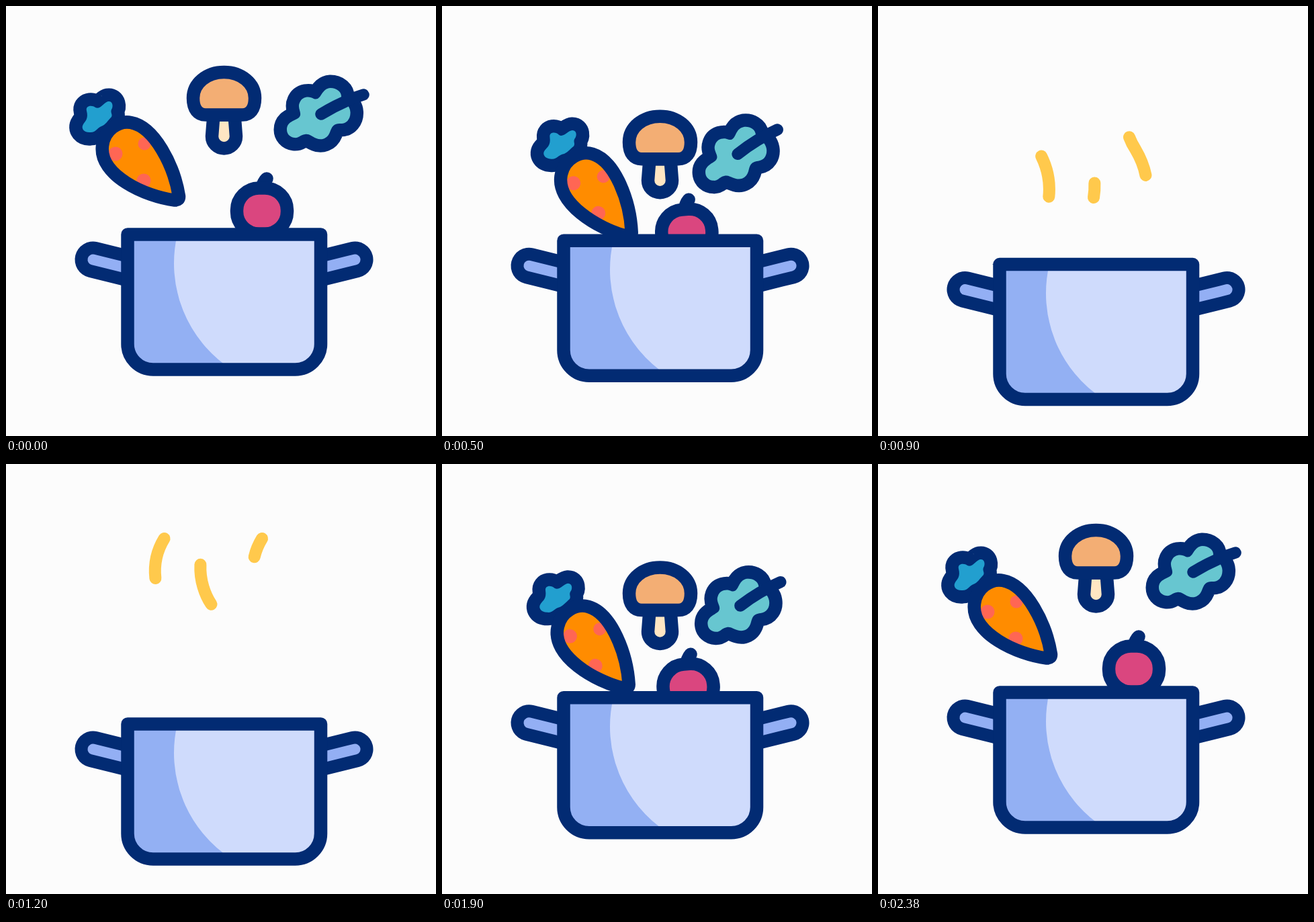
An HTML page that plays this animation: 640 px wide and 640 px high, repeating every 2.4 s.

```html
<!DOCTYPE html>
<html lang="en">
<head>
<meta charset="utf-8">
<title>Cooking pot</title>
<style>
  html, body { margin: 0; height: 100%; overflow: hidden; background: #fcfcfc; }
  svg { display: block; width: 100%; height: 100%; }
  .line { stroke: #022b73; stroke-width: 19.5; }
  .halo { stroke: #022b73; stroke-width: 39; paint-order: stroke; }
  .steam { stroke: #ffc94c; stroke-width: 18; fill: none; }
</style>
</head>
<body>
<svg viewBox="0 0 640 640" stroke-linecap="round" stroke-linejoin="round">
  <defs>
    <path id="wave" pathLength="1" d="M34 290C38 265 34 240 18 213C4 192-8 150 16 111"/>
    <g id="handle" fill="none">
      <path d="M129.500 377.500L180 390" stroke="#022b73" stroke-width="54"/>
      <path d="M129.500 377.500L180 390" stroke="#93aff4" stroke-width="16"/>
    </g>
    <clipPath id="aboveRim"><rect id="air" width="640" height="340"/></clipPath>
  </defs>

  <use class="steam" href="#wave" x="219.500"/>
  <use class="steam" href="#wave" x="287" y="-5"/>
  <use class="steam" href="#wave" x="365"/>

  <g clip-path="url(#aboveRim)">
    <g id="lettuce">
      <path class="halo" fill="#67c6d0" d="M418 184C418 172 430 171 436 166C442 160 433 152 437 144C441 134 452 134 458 138C470 142 468 123 483 122C492 122 499 128 499 134C499 141 512 146 512.500 158C513 168 507 175 498 175C486 175 485 181 482 188C478 198 469 200 462 197C454 194 452 190 445 191C437 192 436 197 429 196C422 195 418 190 418 184Z"/>
      <path d="M469 161Q500 142 532 132" fill="none" stroke="#022b73" stroke-width="17.500"/>
    </g>

    <g id="mushroom" class="line">
      <path fill="#ffe6c3" d="M309 162L306.500 194a18 18 0 0 0 36 0L340 162Z"/>
      <path fill="#f3ae74" d="M278.500 137C278.500 115 299 98.500 324.500 98.500S370.500 115 370.500 137C370.500 154 363 162 352 162H297C286 162 278.500 154 278.500 137Z"/>
    </g>

    <g id="carrot">
      <path class="halo" fill="#229fcf" d="M120 156C118 148 128 147 133 151C140 155 146 143 152 142C159 141 160 150 157 154C155 159 159 161 157 165C152 170 148 177 142 179C136 181 134 188 126 188C116 189 111 182 115 176C118 171 123 168 120 156Z"/>
      <path id="root" fill="#ff8c00" d="M143.500 208C146 184 168 170 186 173.500C221 180 250 237 257.500 283Q258 289 251 289C208 284 138 252 143.500 208Z"/>
      <g fill="#ff6654">
        <circle cx="206" cy="205" r="9.500"/>
        <circle cx="163" cy="220" r="10.500"/>
        <circle cx="205" cy="260" r="10.500"/>
      </g>
      <use class="line" href="#root" style="fill-opacity:0"/>
    </g>

    <g id="beet" class="line">
      <path fill="none" d="M381 272Q382 263 388 257"/>
      <rect fill="#da467f" x="343.500" y="271" width="75" height="68" rx="33"/>
    </g>
  </g>

  <g id="pot">
    <use href="#handle"/>
    <use href="#handle" transform="matrix(-1 0 0 1 649 0)"/>
    <path id="body" fill="#cfdbfc" d="M181 340H468.500V503a38 38 0 0 1-38 38H219a38 38 0 0 1-38-38Z"/>
    <path fill="#93b0f3" d="M181 340H255A188 188 0 0 0 336 541H219a38 38 0 0 1-38-38Z"/>
    <use class="line" href="#body" style="fill-opacity:0"/>
  </g>
</svg>
<script>
  const LOOP = 2400;
  const byId = id => document.getElementById(id);
  const clamp = v => Math.min(1, Math.max(0, v));

  // cubic-bezier(.8, 0, .2, 1)
  function ease(x) {
    x = clamp(x);
    let lo = 0, hi = 1, u = 0.5;
    for (let i = 0; i < 24; i++) {
      u = (lo + hi) / 2;
      const bx = 2.4 * u * (1 - u) ** 2 + 0.6 * u * u * (1 - u) + u ** 3;
      if (bx < x) lo = u; else hi = u;
    }
    return u * u * (3 - 2 * u);
  }

  function place(id, dx, dy, angle = 0, cx = 0, cy = 0) {
    byId(id).setAttribute('transform', `translate(${dx} ${dy}) rotate(${angle} ${cx} ${cy})`);
  }

  const steam = [...document.querySelectorAll('.steam')];
  const steamStart = [730, 847, 650];

  function draw(t) {
    const p = t < 1212 ? ease((t - 14) / 1198) : 1 - ease((t - 1212) / 1125);
    place('pot', 0, 47 * p);
    byId('air').setAttribute('height', 340 + 47 * p);
    place('mushroom', 0, 336 * p);
    place('beet', p * (64 * p - 98), p * (158 + 20 * p), -25 * p, 381, 305);
    place('lettuce', p * (120 * p - 172), p * (297 + 48 * p), -35 * p, 465, 160);
    place('carrot', p * (144 + 138 * p - 275 * p * p), p * (218 + 140 * p - 72 * p * p),
      p * (37 - 14 * p), 195, 230);

    steam.forEach((wisp, i) => {
      const s = (t - steamStart[i]) / 470;
      const head = clamp(s), tail = clamp(s - 0.33);
      wisp.style.display = head > 0 && tail < 1 ? '' : 'none';
      wisp.style.strokeDasharray = `${head - tail} 9`;
      wisp.style.strokeDashoffset = -tail;
    });
  }

  const start = performance.now();
  function frame() {
    draw((performance.now() - start) % LOOP);
    requestAnimationFrame(frame);
  }
  frame();
</script>
</body>
</html>
```
